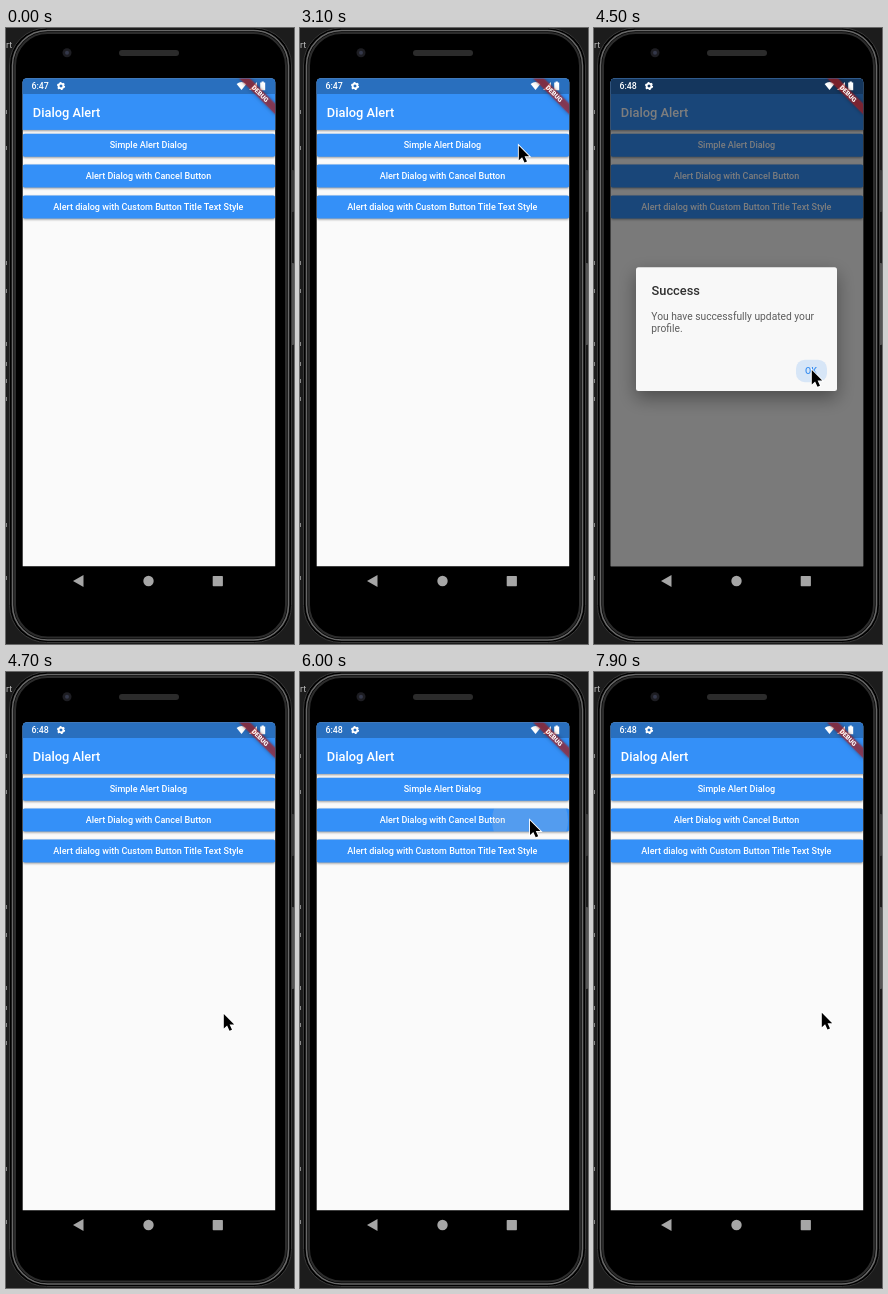
An HTML page that plays this animation: 288 px wide and 616 px high, repeating every 8000 ms.

```html
<!DOCTYPE html>
<html lang="en">
<head>
<meta charset="utf-8">
<title>Dialog alert demo</title>
<style>
html, body { margin: 0; width: 100%; height: 100%; overflow: hidden; background: #1c1c1c; }
svg { display: block; width: 288px; height: 616px; font-family: Roboto, sans-serif; }
.title { font-size: 12.83px; font-weight: 500; }
.label { font-size: 9.03px; font-weight: 500; }
.body { font-size: 10.26px; fill: #5c5c5c; }
.mid { text-anchor: middle; }
.lift { filter: drop-shadow(0 1px 1px rgba(0,0,0,.4)); }
.card { filter: drop-shadow(0 7px 9px rgba(0,0,0,.4)); }
</style>
</head>
<body>
<svg viewBox="0 0 288 616">
  <defs>
    <clipPath id="screen"><rect x="16.7" y="50.6" width="252.5" height="487.6" rx="4"/><rect x="16.7" y="500" width="252.5" height="38.2"/></clipPath>
    <clipPath id="tapArea"><rect id="tapRect" x="16.7" width="252.5" height="23" rx="2"/></clipPath>
  </defs>

  <!-- desktop edge -->
  <rect width="288" height="616" fill="#1c1c1c"/>
  <text x="0" y="19.5" font-size="9" fill="#bbb">rt</text>
  <path d="M0 84h1M0 120h1M0 235h1M0 263h1M0 316h1M0 336h1M0 353h1M0 371h1M0 497h1M0 550h1" stroke="#888" stroke-width="4"/>
  <rect x="285" y="235" width="3" height="82" rx="1" fill="#555"/>
  <rect x="285" y="142" width="3" height="42" rx="1" fill="#3c3c3c"/>

  <!-- phone -->
  <g fill="#000">
    <rect x="3.5" y="0" width="282" height="614.5" rx="37" stroke="#3a3a3a"/>
    <rect x="6.5" y="2.5" width="276" height="609.5" rx="35" stroke="#686868" stroke-width="1.6"/>
    <rect x="9" y="5" width="271" height="604.5" rx="32.5" stroke="#2c2c2c" stroke-width="2"/>
  </g>
  <circle cx="61" cy="24.7" r="4.5" fill="#1d1d22"/>
  <circle cx="61" cy="24.7" r="2" fill="#34384a"/>
  <rect x="113" y="22" width="60" height="6" rx="3" fill="#2b2b2b"/>
  <g fill="#a6a6a6">
    <path d="M67 553l10.5-6v12z"/>
    <circle cx="142.5" cy="553" r="5.2"/>
    <rect x="206.7" y="548" width="10.2" height="10.2" rx=".7"/>
  </g>

  <g clip-path="url(#screen)">
    <rect x="16" y="50" width="254" height="489" fill="#fafafa"/>
    <g id="buttons" fill="#fff"></g>
    <circle id="splash" clip-path="url(#tapArea)" fill="#c8c8c8"/>
    <rect class="lift" x="16" y="50" width="254" height="51.9" fill="#3490f8"/>
    <rect x="16" y="50" width="254" height="16" fill="#296fbe"/>
    <text class="title" x="26.8" y="88.5" fill="#fff">Dialog Alert</text>

    <rect id="scrim" x="16" y="50" width="254" height="489" fill="#000"/>
    <g id="dialog">
      <rect class="card" x="42" y="239.3" width="201" height="123.8" rx="2.5" fill="#fff"/>
      <rect id="press" y="331.7" height="22.5" rx="9" fill="#3490f8" opacity=".17"/>
      <text id="heading" class="title" x="57.5" y="267.1" fill="#2c2c2c"></text>
      <text id="line1" class="body" x="57.3" y="291.9"></text>
      <text id="line2" class="body" x="57.3" y="303.9"></text>
      <text id="cancel" class="label mid" x="170.8" y="345.9" fill="#3490f8">Cancel</text>
      <text id="accept" class="label mid" x="217" y="345.9" fill="#3490f8"></text>
    </g>

    <!-- status bar -->
    <g fill="#fff">
      <text id="clock" x="25.5" y="61.3" font-size="8.8" font-weight="500"></text>
      <circle cx="55" cy="58" r="2.4" fill="none" stroke="#fff" stroke-width="1.8"/>
      <circle cx="55" cy="58" r="3.5" fill="none" stroke="#fff" stroke-width="1.2" stroke-dasharray="1.83"/>
      <path d="M230.6 56q4.9-3.8 9.8 0l-4.9 6z"/>
      <path d="M251 54v8h-8z"/>
      <path d="M254.2 54.6h1.4v-1h2.2v1h1.4v7.6h-5z"/>
    </g>
    <g transform="translate(269.2 50.6) rotate(45)">
      <rect x="-26" y="17.6" width="52" height="7.7" fill="#b71c1c" fill-opacity=".63" style="filter:drop-shadow(0 0 2px rgba(0,0,0,.5))"/>
      <text class="mid" y="23.6" font-size="6.5" font-weight="900" fill="#fff">DEBUG</text>
    </g>
  </g>

  <path id="cursor" d="M0 0V14.4L3.3 11.4L5.7 16.8L8.2 15.7L5.8 10.5H10.4Z" fill="#000" stroke="#fff" stroke-width="1.8" paint-order="stroke"/>
</svg>
<script>
const $ = id => document.getElementById(id);
const set = (id, attrs) => {
  for (const k in attrs) $(id).setAttribute(k, attrs[k]);
};
const clamp = v => Math.max(0, Math.min(1, v));
const easeOut = v => 1 - (1 - v) ** 2;
const smooth = v => v * v * (3 - 2 * v);

const LOOP = 8000, STEP = 100, FADE = 150;
const buttonY = i => 105.7 + i * 30.85;

$('buttons').innerHTML = [
  'Simple Alert Dialog',
  'Alert Dialog with Cancel Button',
  'Alert dialog with Custom Button Title Text Style'
].map((label, i) => `
  <rect class="lift" x="16.7" y="${buttonY(i)}" width="252.5" height="23" rx="2" fill="#3490f8"/>
  <text class="label mid" x="142.4" y="${buttonY(i) + 14.7}">${label}</text>`).join('');

const dialogs = [
  { tap: 3150, open: 3350, press: 4350, close: 4465, button: 0, pressX: 202, pressW: 31,
    heading: 'Success', line1: 'You have successfully updated your', line2: 'profile.', accept: 'OK' },
  { tap: 5850, open: 6050, press: 7350, close: 7450, button: 1, pressX: 198, pressW: 38,
    heading: 'Message', line1: 'Do you want to upload your profile', line2: 'picture?', accept: 'Upload' }
];

// Pointer stops: time, x, y
const path = [
  [1400, 280, 284], [1800, 244, 160], [2700, 218.8, 117.8], [3600, 218.8, 117.8],
  [4200, 217.8, 342], [4800, 217.8, 342], [5500, 230, 148.5], [6300, 230, 148.5],
  [6900, 228.8, 342], [7500, 228.8, 342], [7800, 227.8, 340.8], [8000, 227.8, 340.8]
];

function pointer(t) {
  const i = Math.max(1, path.findIndex(p => p[0] > t));
  const [a, b] = [path[i - 1], path[i]];
  const k = smooth(clamp((t - a[0]) / (b[0] - a[0])));
  return [a[1] + (b[1] - a[1]) * k, a[2] + (b[2] - a[2]) * k];
}

function draw(t) {
  const d = dialogs[t < 5500 ? 0 : 1];
  const [x, y] = pointer(t);
  set('cursor', { transform: `translate(${x} ${y})`, visibility: t < path[0][0] ? 'hidden' : 'visible' });

  const age = t - d.tap;
  set('tapRect', { y: buttonY(d.button) });
  set('splash', {
    cx: x, cy: y, r: age > 0 ? 8 + age * .2 : 0,
    opacity: age > 0 ? .25 * clamp(1 - (age - 100) / 300) : 0
  });

  const shown = t < d.close ? clamp((t - d.open) / FADE) : clamp(1 - (t - d.close) / FADE);
  const alpha = easeOut(shown);
  set('scrim', { opacity: .54 * alpha });
  set('dialog', { opacity: alpha });
  set('press', { x: d.pressX, width: d.pressW, visibility: t > d.press ? 'visible' : 'hidden' });
  set('cancel', { visibility: d.button ? 'visible' : 'hidden' });
  for (const id of ['heading', 'line1', 'line2', 'accept']) $(id).textContent = d[id];
  $('clock').textContent = t < 3600 ? '6:47' : '6:48';
}

const start = performance.now();
function tick() {
  const t = (performance.now() - start) % LOOP;
  draw(Math.floor(t / STEP) * STEP);
  requestAnimationFrame(tick);
}
tick();
</script>
</body>
</html>
```
